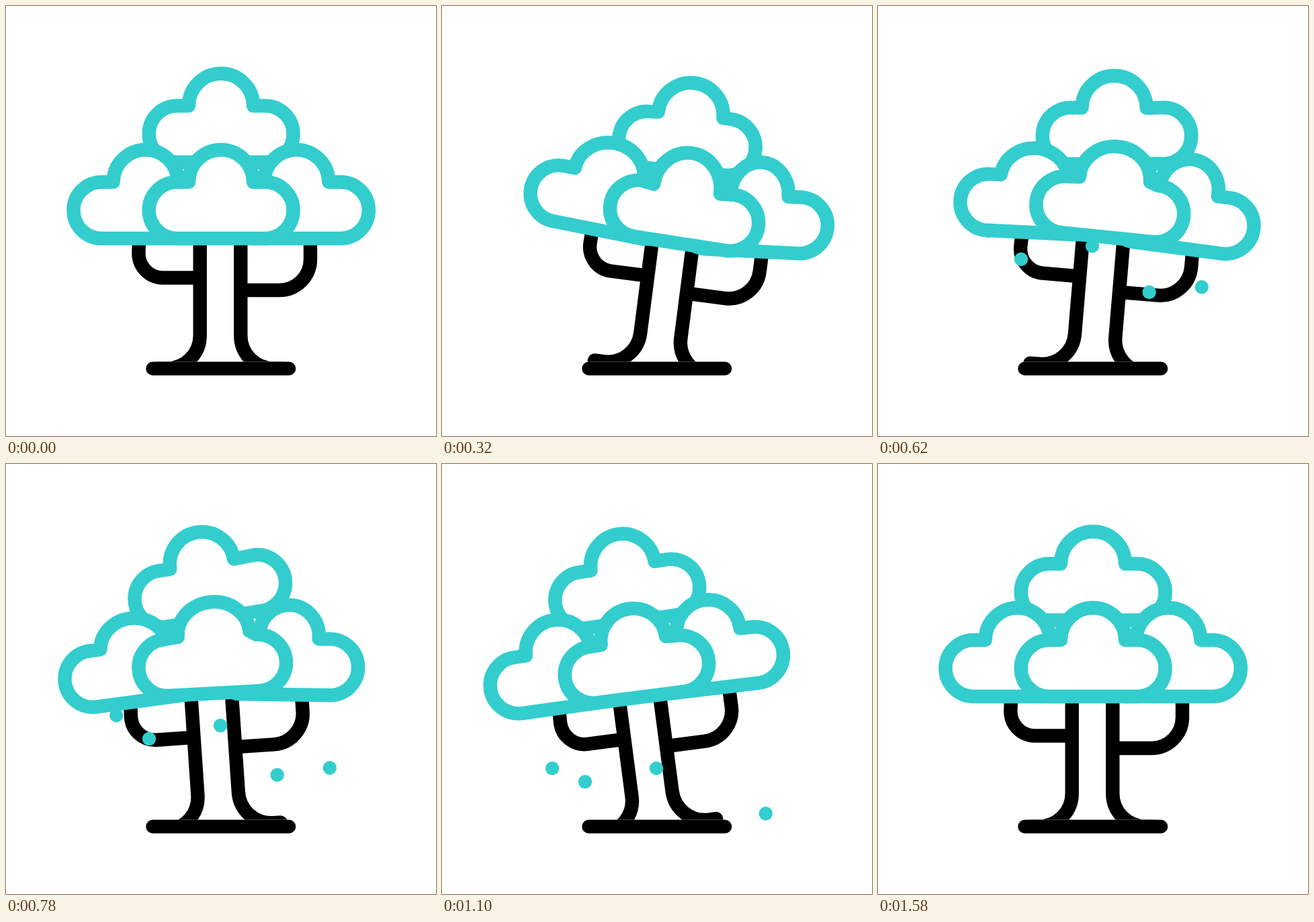
An HTML page with a canvas that plays this animation: 640x640 px, repeating every 2400 ms.

```html
<!DOCTYPE html>
<html lang="en">
<head>
<meta charset="utf-8">
<title>Swaying tree</title>
<style>
  html, body { margin: 0; width: 100%; height: 100%; overflow: hidden; background: #fff; }
  canvas { display: block; }
</style>
</head>
<body>
<canvas id="stage" width="640" height="640"></canvas>
<script>
const ctx = document.getElementById('stage').getContext('2d');
const LOOP = 2400, TEAL = '#33cdcd', GROUND_TOP = 529.5, LOBE = 42;
const PIVOT = { x: 320, y: 540 };

// Each bend list shifts: left lobe x, y; left notch x, y; right notch x, y; right lobe x, y; bump height.
const clouds = [
  { x: 320, y: 190.5, right: [7, 13, 1, 12, 2, 9, -4, 9, 0], left: [2, 5, -1.5, 4, -2, -5, 13, -9, 0] },
  { x: 207.7, y: 304, right: [-1, -4, 1, -3, 9, 5, 0, 5, 0], left: [2.5, 3.5, -1, 2.5, 4, 10, 0, -5, -1] },
  { x: 432.3, y: 304, right: [0, 8, 11, 3, 1, -1, 5, -3, 0], left: [0, -1, 12, -6, 4, 9, 0, 10, -2] },
  { x: 320, y: 304, right: [7, 3, 8, 6, 12, 8, 15, 6.5, 6], left: [1, -6, 3, -8, 14, -10, 6, -4, 0] }
];

// Falling at constant speed: y is the height at 780 ms, from is where the dot appears.
const dots = [
  { x: 213, y: 408.8, speed: 0.2, from: 320 },
  { x: 403.7, y: 462.5, speed: 0.23, from: 320 },
  { x: 481.8, y: 452, speed: 0.2125, from: 388 },
  { x: 319, y: 389, speed: 0.199, from: 320 },
  { x: 164.2, y: 374, speed: 0.246, from: 320 }
];

const trunk = new Path2D(
  'M288.7 335V490A49 49 0 0 1 239.7 539.5H226' +
  'M349.3 335V490A49 49 0 0 0 398.3 539.5H409' +
  'M198.3 340L197.4 368A36 36.5 0 0 0 233 404.5H285' +
  'M453 340V377A46 46 0 0 1 407 423H355');

const swayKeys = [[0, 0], [460, 9.4], [960, -9.4], [1440, 0]];
const rightKeys = [[0, 0], [300, 1], [760, 0]];
const leftKeys = [[300, 0], [760, 1], [1200, 0]];

function track(keys, t) {
  if (t <= keys[0][0]) return keys[0][1];
  for (let i = 1; i < keys.length; i++) {
    const [t0, v0] = keys[i - 1], [t1, v1] = keys[i];
    if (t < t1) {
      const p = (t - t0) / (t1 - t0);
      return v0 + (v1 - v0) * p * p * (3 - 2 * p);
    }
  }
  return keys[keys.length - 1][1];
}

function drawCloud({ x, y, right, left }, wRight, wLeft) {
  const d = right.map((v, i) => v * wRight + left[i] * wLeft);
  const ax = x - 48 + d[2], ay = y - LOBE + d[3];
  const bx = x + 48 + d[4], by = y - LOBE + d[5];
  const half = Math.hypot(bx - ax, by - ay) / 2;
  ctx.beginPath();
  ctx.arc(x - 65.3 + d[0], y + d[1], LOBE, Math.PI / 2, Math.PI * 1.5);
  ctx.lineTo(ax, ay);
  ctx.ellipse((ax + bx) / 2, (ay + by) / 2, half, 48 + d[8],
    Math.atan2(by - ay, bx - ax), Math.PI, Math.PI * 2);
  ctx.arc(x + 65.6 + d[6], y + d[7], LOBE, -Math.PI / 2, Math.PI / 2);
  ctx.closePath();
  ctx.fill();
  ctx.stroke();
}

function swayed(angle, draw) {
  ctx.save();
  ctx.translate(PIVOT.x, PIVOT.y);
  ctx.rotate(angle);
  ctx.translate(-PIVOT.x, -PIVOT.y);
  draw();
  ctx.restore();
}

function drawDots(t) {
  ctx.fillStyle = TEAL;
  for (const dot of dots) {
    const y = dot.y + (t - 780) * dot.speed;
    if (y < dot.from || y > 535.5) continue;
    ctx.beginPath();
    ctx.arc(dot.x, y, 10.2, 0, Math.PI * 2);
    ctx.fill();
  }
}

function render(t) {
  const angle = track(swayKeys, t) * Math.PI / 180;
  const wRight = track(rightKeys, t), wLeft = track(leftKeys, t);
  ctx.fillStyle = '#fff';
  ctx.fillRect(0, 0, 640, 640);
  ctx.lineWidth = 20.4;
  ctx.lineCap = ctx.lineJoin = 'round';

  ctx.strokeStyle = '#000';
  ctx.save();
  ctx.beginPath();
  ctx.rect(0, 0, 640, GROUND_TOP);
  ctx.clip();
  swayed(angle, () => ctx.stroke(trunk));
  ctx.restore();

  drawDots(t);

  ctx.fillStyle = '#fff';
  ctx.strokeStyle = TEAL;
  swayed(angle, () => clouds.forEach(c => drawCloud(c, wRight, wLeft)));

  ctx.fillStyle = '#000';
  ctx.beginPath();
  ctx.roundRect(208.3, GROUND_TOP, 223, 20.3, 10.15);
  ctx.fill();
}

function tick() {
  render(performance.now() % LOOP);
  requestAnimationFrame(tick);
}
tick();
</script>
</body>
</html>
```
